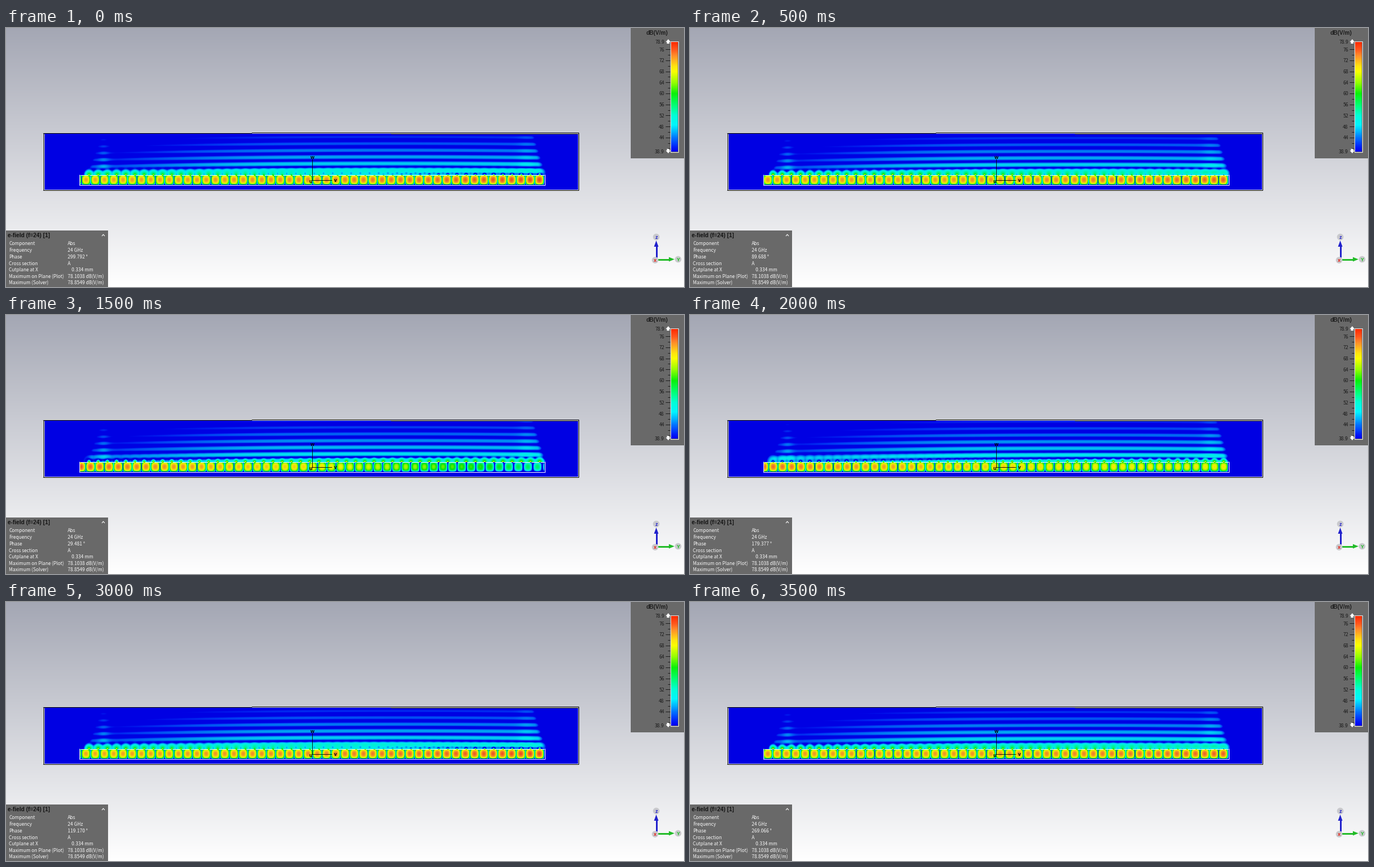
Recreate the animation shown at these times as a matplotlib script. Size 1209 px wide and 463 px high, loop 4 s.

```python
import numpy as np
import matplotlib.pyplot as plt
from matplotlib.animation import FuncAnimation
from matplotlib.colors import LinearSegmentedColormap
from matplotlib.patches import Circle, Polygon, Rectangle

W, H, DPI = 1209, 463, 100
FRAMES, INTERVAL = 8, 500
DB_MIN, DB_MAX = 38.9, 78.9
PANEL = "#696969"
BODY, BOLD = "Noto Sans CJK JP", "Liberation Sans"
PX = 72 / DPI

RAMP = [
    (38.9, (0, 0, 240)), (40.5, (0, 30, 250)), (42, (0, 70, 255)),
    (44, (0, 120, 255)), (46, (0, 180, 255)), (48.5, (0, 245, 255)),
    (52, (0, 255, 215)), (56, (0, 255, 110)), (60, (10, 240, 10)),
    (64, (150, 255, 0)), (68, (250, 255, 0)), (70, (255, 228, 15)),
    (72, (255, 182, 30)), (74, (255, 138, 42)), (76, (255, 88, 30)),
    (78.9, (255, 40, 0)),
]


def ramp(shade):
    return LinearSegmentedColormap.from_list(
        "field",
        [((db - DB_MIN) / (DB_MAX - DB_MIN), np.array(rgb) / 255 * shade)
         for db, rgb in RAMP],
        N=512,
    )


# Field region, sampled at pixel centres
LEFT, RIGHT, TOP, BOTTOM = 67, 1020, 188, 289
X, Y = np.meshgrid(np.arange(LEFT, RIGHT) + 0.5, np.arange(TOP, BOTTOM) + 0.5)
GUIDE = (130.5, 263, 960.5, 280)
U = np.clip((X - GUIDE[0]) / (GUIDE[2] - GUIDE[0]), 0, 1)
INSIDE = (X > GUIDE[0]) & (X < GUIDE[2]) & (Y > GUIDE[1]) & (Y < GUIDE[3])
CELL = 16.51
SLOT_X, SLOT_STEP, SLOTS = 148, 16.4, 50
HALF_WAVE = 11.9


def linear(db):
    return 10 ** (db / 20)


def guide_field(phase):
    """Wave that travels on the left and stands still at the right end."""
    standing = linear(np.interp(U, [0, 0.5, 1], [72.3, 73.8, 76.5]))
    moving = linear(np.interp(U, [0, 0.5, 0.7, 0.88, 1], [75.5, 70, 65, 59.5, 50]))
    p = np.radians(phase - 115)
    kx = np.pi * (X - 951) / CELL
    profile = np.cos(np.pi * (Y - 271.2) / 18.4) ** 2
    wave = standing * np.cos(kx) * np.cos(p) + moving * np.sin(kx) * np.sin(p)
    return wave * np.maximum(profile, 1e-4) ** 0.42


def radiated_field(phase):
    """Wave fronts that rise from the guide."""
    rise = np.clip((X - 200) / 350, 0, 1)
    level = 35.6 + 5.6 * rise * (2 - rise) + 0.133 * (Y - 195)
    level += 3.8 * np.exp(-((X - 174) / 11) ** 2) + 1.4 * np.exp(-((X - 928) / 15) ** 2)
    start = 170 - 0.27 * (Y - 195)
    stop = 937 + 0.22 * (Y - 195)
    level -= 0.1 * np.maximum(0, np.maximum(start - X, X - stop)) ** 2
    sag = np.where(X < 700, 5 * ((700 - X) / 520) ** 2, 1.3 * ((X - 700) / 240) ** 2)
    return linear(level) * np.cos(np.pi * ((250 + sag - Y) / HALF_WAVE - phase / 180))


def slot_field(phase):
    """Near field around the slots in the upper wall."""
    index = np.clip(np.round((X - SLOT_X) / SLOT_STEP), 0, SLOTS - 1)
    dx = X - SLOT_X - index * SLOT_STEP
    r = np.sqrt(1.3 * dx ** 2 + (262.5 - Y) ** 2)
    level = 62.5 - 1.8 * r + 10 * np.exp(-r ** 2 / 2)
    return linear(level) * np.cos(np.radians(phase - 110 + 80 * U - 8 * (r - 4)))


def field_db(phase):
    outside = np.hypot(radiated_field(phase), slot_field(phase)) * (Y < GUIDE[1])
    total = np.where(INSIDE, guide_field(phase), outside)
    return 20 * np.log10(np.abs(total) + 1e-6)


fig = plt.figure(figsize=(W / DPI, H / DPI), dpi=DPI)
ax = fig.add_axes([0, 0, 1, 1])


def text(x, y, s, size=8.4, color="#f4f4f4", ha="left", bold=False):
    return ax.text(x, y, s, fontsize=size * PX, color=color, ha=ha,
                   va="center_baseline", family=BOLD if bold else BODY,
                   weight="bold" if bold else "normal", zorder=6)


def line(xs, ys, color="black", width=1.0, **style):
    ax.plot(xs, ys, color=color, lw=width * PX, solid_capstyle="butt",
            dash_capstyle="butt", zorder=4, **style)


def box(x0, y0, x1, y1, face="none", edge="none", width=1.0):
    ax.add_patch(Rectangle((x0, y0), x1 - x0, y1 - y0, facecolor=face,
                           edgecolor=edge, lw=width * PX, zorder=3))


def shape(points, color):
    ax.add_patch(Polygon(points, facecolor=color, edgecolor="none", zorder=5))


def draw_backdrop():
    t = np.linspace(0, 1, H)[:, None, None]
    shade = np.array([164, 167, 180]) * (1 - t) + 255 * t
    ax.imshow(shade / 255, extent=(0, W, H, 0), aspect="auto", interpolation="nearest")


def draw_outlines():
    line([438, 1020], [187.5, 187.5], "#d8d9de")
    line([686, 1020], [188.5, 188.5], "#3c3c20")
    line([67.5, 67.5], [189, 289], "#e4e4ea")
    line([66, 438], [187.5, 187.5])
    line([438, 1021], [186.5, 186.5])
    line([66.5, 66.5], [188, 290])
    line([1020.5, 1020.5], [187, 290])
    line([66, 1021], [289.5, 289.5])

    # Guide wall, open at each slot
    gap = 3
    line([130, 960], [262.5, 262.5], "white", linestyle=(
        -(SLOT_X + gap / 2 - 130 - SLOT_STEP) * 1.0, (SLOT_STEP - gap, gap)))
    line([130.5, 130.5, 960.5, 960.5], [262, 280.5, 280.5, 262], "white")


def draw_local_axes():
    line([545.5, 545.5], [234, 272], width=0.9)
    line([545, 581], [271.5, 271.5], width=0.9)
    for x, y, s in [(545.5, 230, "w"), (587, 271.5, "v"), (543, 273.5, "u")]:
        text(x, y, s, 9, "black", "center", True)


def draw_scale():
    box(1113.5, 0, W, 233, PANEL)
    text(1161, 8.5, "dB(V/m)", 10.1, "#1c1c1c", "center", True)
    ax.imshow(np.linspace(1, 0, 256)[:, None], cmap=ramp(1), vmin=0, vmax=1,
              extent=(1185, 1198, 221, 24), aspect="auto", zorder=3)
    box(1184.5, 23.5, 1198.5, 221.5, edge="#e8e8e8")

    def to_y(db):
        return 24 + (DB_MAX - db) * 4.92

    for db in range(40, 78, 2):
        major = db % 4 == 0 and db > 40
        line([1176 if major else 1180, 1184], [to_y(db)] * 2, "#1c1c1c")
        if major:
            text(1174, to_y(db), str(db), 8.7, "#1c1c1c", "right")
    for db in (DB_MAX, DB_MIN):
        text(1174, to_y(db), f"{db}", 8.7, "#1c1c1c", "right")
    for y, s in [(24, 1), (220, -1)]:
        shape([(1176.5, y + s), (1181, y - 4 * s), (1185, y + s), (1183, y + s),
               (1183, y + 4 * s), (1178.5, y + 4 * s), (1178.5, y + s)], "white")


def draw_info():
    box(0, 361.5, 182, H, PANEL)
    text(3, 370.5, "e-field (f=24) [1]", 10.1, "#141414", bold=True)
    line([171, 173.5, 176], [372, 369, 372], "white", 1.1)
    rows = [("Component", "Abs"), ("Frequency", "24 GHz"), ("Phase", ""),
            ("Cross section", "A"), ("Cutplane at X", "0.334 mm"),
            ("Maximum on Plane (Plot)", "78.1038 dB(V/m)"),
            ("Maximum (Solver)", "78.8549 dB(V/m)")]
    for i, (label, value) in enumerate(rows):
        y = 385 + 11.7 * i
        text(5, y, label)
        text(117 if label.startswith("Cutplane") else 109.5, y, value)
    return text(109.5, 385 + 2 * 11.7, "")


def draw_triad():
    blue, green, red = "#2020cc", "#22bc28", "#e81c10"
    line([1159.5, 1159.5], [410, 389], blue, 3)
    shape([(1155.5, 391), (1159.5, 380), (1163.5, 391)], blue)
    line([1162, 1184], [413.5, 413.5], green, 3)
    shape([(1182, 409.5), (1192, 413.5), (1182, 417.5)], green)
    for x, y, s, color in [(1159.5, 373.5, "z", blue), (1198.5, 413.5, "Y", green),
                           (1157.5, 415, "x", red)]:
        ax.add_patch(Circle((x, y), 5.8, facecolor="#c9c9cd", edgecolor="none", zorder=5))
        text(x, y, s, 9, color, "center", True)


def phase_at(frame):
    return (299.7922 + 149.89624 * frame) % 360


draw_backdrop()
field = ax.imshow(field_db(phase_at(0)), cmap=ramp(0.95), vmin=DB_MIN, vmax=DB_MAX,
                  extent=(LEFT, RIGHT, BOTTOM, TOP), aspect="auto",
                  interpolation="nearest", zorder=2)
draw_outlines()
draw_local_axes()
draw_scale()
phase_label = draw_info()
draw_triad()
ax.set_xlim(0, W)
ax.set_ylim(H, 0)
ax.axis("off")


def update(frame):
    phase = phase_at(frame)
    field.set_data(field_db(phase))
    phase_label.set_text(f"{phase:.3f} °")
    return field, phase_label


anim = FuncAnimation(fig, update, frames=FRAMES, interval=INTERVAL,
                     repeat=True, repeat_delay=0, blit=False)
plt.show()
```
